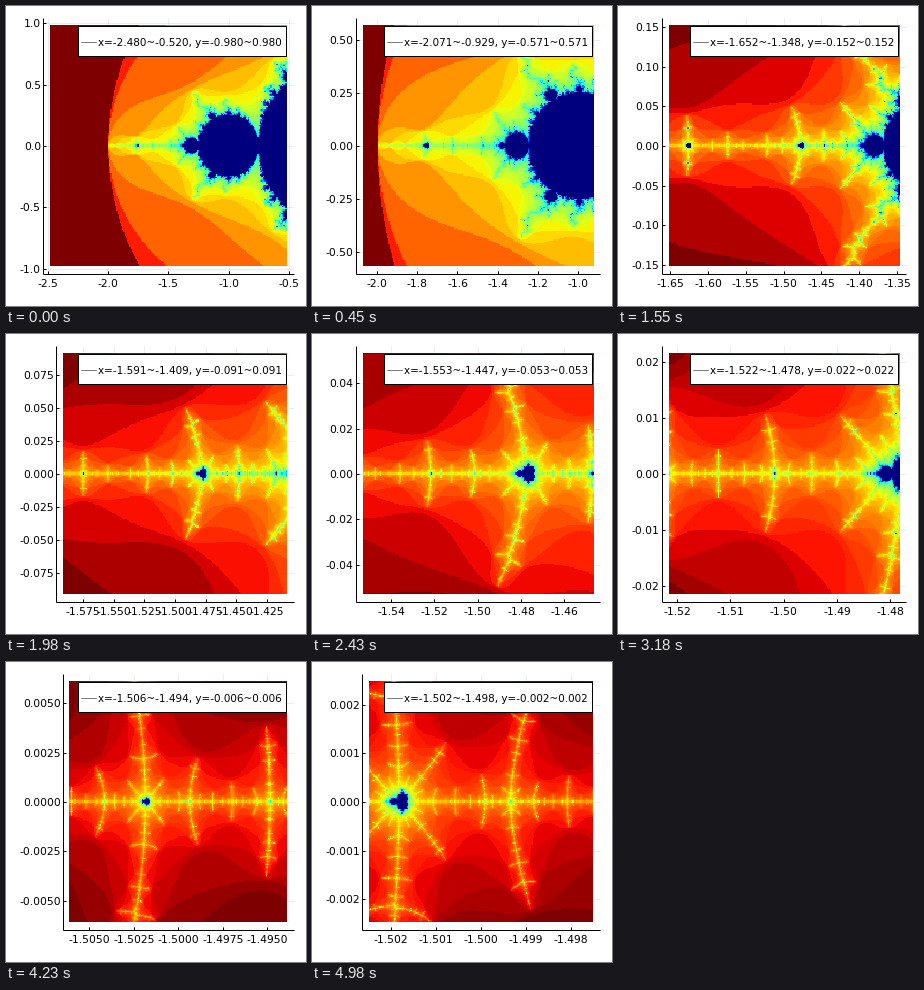
Recreate the animation shown at these times as a matplotlib script. Size 300 by 300 pixels, loop 5010 ms.

```python
import math
from functools import lru_cache

import numpy as np
import matplotlib.pyplot as plt
from matplotlib.animation import FuncAnimation
from matplotlib.collections import LineCollection
from matplotlib.patches import Rectangle

SIZE, DPI = 300, 100
PX = 72 / DPI
TICK_FONT, LEGEND_FONT = 10.8, 10.4
CENTER = -1.5
STEPS = 200
GRID = 200
MAX_ITER = 256
TOP, BOTTOM, RIGHT = 12.3, 267.7, 287.6
WIDEN = 1.06

plt.rcParams["font.family"] = "DejaVu Sans"


def half_width(step):
    return 0.98 * math.exp(-0.03004 * step)


@lru_cache(maxsize=None)
def escape_image(step):
    """Log-scaled escape times, 1 for the fastest and 0 inside the set."""
    w = half_width(step)
    axis = np.linspace(-w, w, GRID)
    c = (CENTER + axis[None, :] + 1j * axis[GRID // 2:, None]).ravel()
    count = np.full(c.size, MAX_ITER)
    live = np.arange(c.size)
    z = c.copy()
    for n in range(1, MAX_ITER):
        out = z.real ** 2 + z.imag ** 2 > 4
        if out.any():
            count[live[out]] = n
            keep = ~out
            live, z, c = live[keep], z[keep], c[keep]
        z = z * z + c
    half = np.log(count.reshape(GRID // 2, GRID))
    lo, hi = half.min(), half.max()
    value = (hi - half) / (hi - lo)
    return np.vstack([value[::-1], value]).astype(np.float32)


def nice_ticks(lo, hi):
    """Pick a round tick step by granularity, coverage and niceness."""
    span = hi - lo
    base = math.floor(math.log10(span))
    best = (-1, None, 0)
    for z in range(base - 2, base + 1):
        for q, nice in ((1, 1), (5, 0.9), (2, 0.7), (2.5, 0.5), (3, 0.2)):
            step = q * 10.0 ** z
            first, last = math.floor(lo / step), math.ceil(hi / step)
            ticks = [i * step for i in range(first, last + 1)
                     if lo <= i * step <= hi]
            if not 4 <= len(ticks) <= 8:
                continue
            k = last - first + 1
            grain = max(0, 1 - abs(k - 5) / 5)
            cover = 1.5 * span / ((k - 1) * step)
            score = grain / 4 + cover / 3 + nice / 4
            if score > best[0]:
                best = (score, ticks, -z + (q == 2.5))
    return best[1], max(best[2], 1)


def tick_text(value, digits):
    text = f"{value:.{digits}f}"
    return text[1:] if float(text) == 0 and text[0] == "-" else text


fig = plt.figure(figsize=(SIZE / DPI, SIZE / DPI), dpi=DPI, facecolor="white")
ax = fig.add_axes([0, 0, 1, 1])
ax.set_axis_off()

heat = ax.imshow(np.zeros((GRID, GRID)), cmap="jet", vmin=0, vmax=1,
                 interpolation="nearest", aspect="auto", zorder=2)
grid = LineCollection([], colors="black", alpha=0.1, linewidths=0.7 * PX, zorder=1)
marks = LineCollection([], colors="black", linewidths=PX, zorder=3)
ax.add_collection(grid, autolim=False)
ax.add_collection(marks, autolim=False)


def label(x, y, ha, size=TICK_FONT):
    return ax.text(x, y, "", fontsize=size * PX, ha=ha, va="center_baseline", zorder=6)


x_labels = [label(0, 277, "center") for _ in range(8)]
y_labels = [label(0, 0, "right") for _ in range(8)]

ax.add_patch(Rectangle((71.5, 19.5), 208, 30, fc="white", ec="black",
                       lw=PX, zorder=4))
ax.plot([74.5, 90], [35.5, 35.5], color="black", lw=0.5 * PX, zorder=5)
legend = label(92, 36, "left", LEGEND_FONT)
ax.set_xlim(0, SIZE)
ax.set_ylim(SIZE, 0)


def draw(frame):
    step = min(frame * 10 // 25, STEPS - 1)
    w = half_width(step)
    h = w * WIDEN
    xs, xd = nice_ticks(CENTER - h, CENTER + h)
    ys, yd = nice_ticks(-h, h)

    # The left axis makes room for the widest y label.
    left = 30.5 + 6.6 * yd
    mid_x, mid_y = (left + RIGHT) / 2, (TOP + BOTTOM) / 2
    sx, sy = (RIGHT - left) / (2 * h), (BOTTOM - TOP) / (2 * h)
    px = [mid_x + (x - CENTER) * sx for x in xs]
    py = [mid_y - y * sy for y in ys]

    heat.set_data(escape_image(step))
    heat.set_extent((mid_x - w * sx, mid_x + w * sx, mid_y + w * sy, mid_y - w * sy))
    grid.set_segments([[(x, TOP), (x, BOTTOM)] for x in px]
                      + [[(left, y), (RIGHT, y)] for y in py])
    marks.set_segments([[(left, TOP), (left, BOTTOM)], [(left, BOTTOM), (RIGHT, BOTTOM)]]
                       + [[(x, BOTTOM), (x, BOTTOM - 3)] for x in px]
                       + [[(left, y), (left + 3, y)] for y in py])

    for text in x_labels + y_labels:
        text.set_text("")
    for text, x, value in zip(x_labels, px, xs):
        text.set_x(x)
        text.set_text(tick_text(value, xd))
    for text, y, value in zip(y_labels, py, ys):
        text.set_position((left - 2.2, y))
        text.set_text(tick_text(value, yd))
    legend.set_text(f"x={CENTER - w:.3f}~{CENTER + w:.3f}, y={-w:.3f}~{w:.3f}")
    return []


anim = FuncAnimation(fig, draw, frames=501, interval=10, repeat=True,
                     repeat_delay=0, cache_frame_data=False)
plt.show()
```
